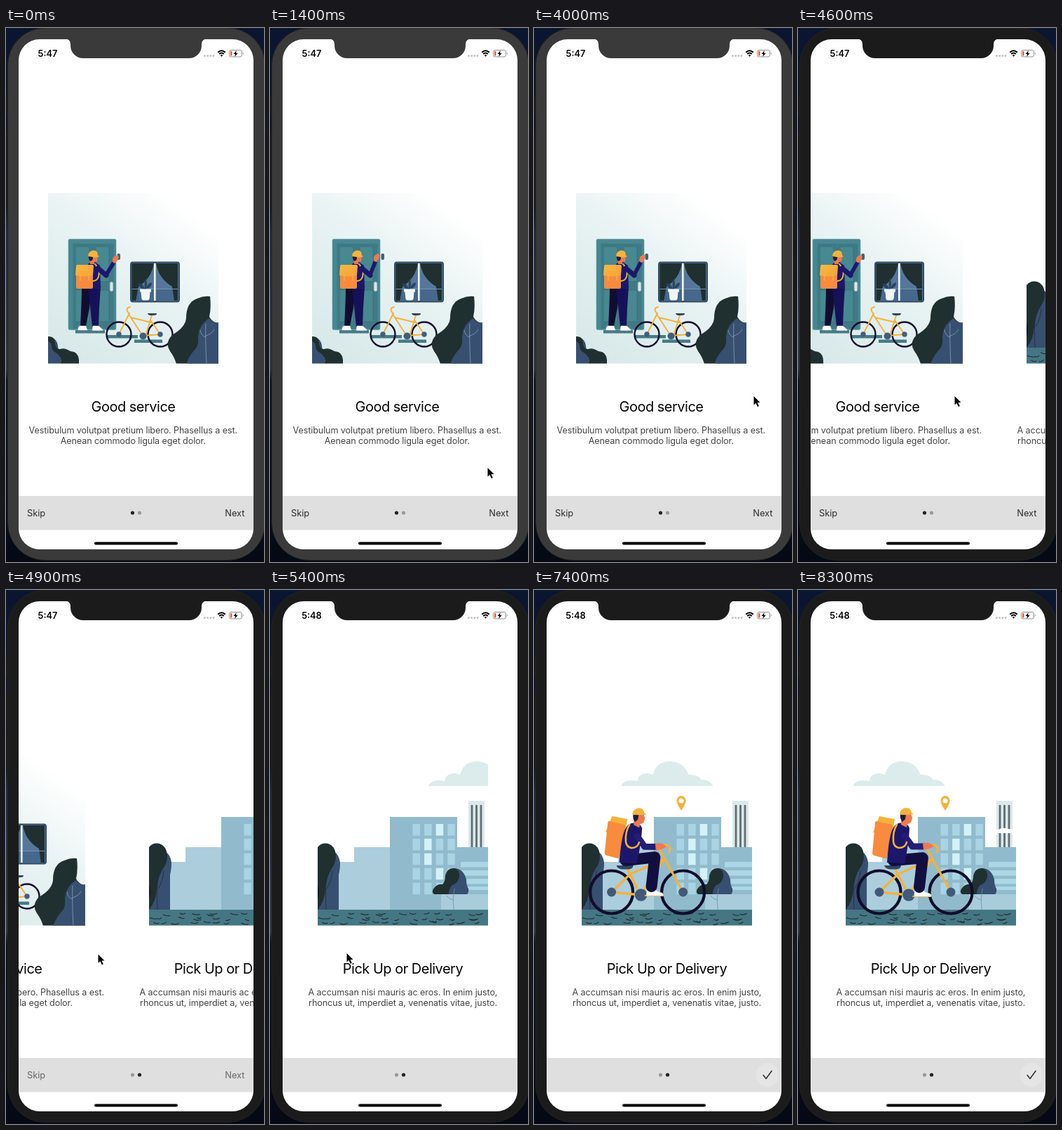
An HTML page that plays this animation: 368x760 px, repeating every 8.4 s.

```html
<!DOCTYPE html>
<html lang="en">
<head>
<meta charset="utf-8">
<title>Onboarding</title>
<style>
html, body { margin: 0; width: 100%; height: 100%; overflow: hidden; background: #0a1429; }
svg { display: block; width: 368px; height: 760px; font-family: Inter, Roboto, sans-serif; }
.mid { text-anchor: middle; }
.title { font-size: 20px; letter-spacing: -.025em; fill: #050505; }
.body { font-size: 12.6px; letter-spacing: -.1px; fill: #444; }
.bar { font-size: 12.8px; fill: #2b2b2b; }
.line { fill: none; stroke-linecap: round; stroke-linejoin: round; }
.yellow { stroke: #f4b13c; }
.ink { fill: #202f30; }
.slate { fill: #374f70; }
</style>
</head>
<body>
<svg viewBox="0 0 368 760">
  <defs>
    <linearGradient id="desk" x2="0" y2="1">
      <stop stop-color="#0a1530"/><stop offset=".33" stop-color="#10172c"/>
      <stop offset=".38" stop-color="#242b48"/><stop offset=".64" stop-color="#333a52"/>
      <stop offset=".66" stop-color="#0b142a"/><stop offset="1" stop-color="#050914"/>
    </linearGradient>
    <linearGradient id="wall" x1=".2" y1="1" x2=".85" y2=".12">
      <stop stop-color="#d8e9e9"/><stop offset=".6" stop-color="#e9f3f3"/><stop offset="1" stop-color="#fff"/>
    </linearGradient>
    <linearGradient id="flap" x2="1" y2="1">
      <stop stop-color="#f9b93f"/><stop offset="1" stop-color="#f6a13a"/>
    </linearGradient>
    <clipPath id="screen"><rect x="18" y="16" width="335" height="726" rx="30"/></clipPath>
    <clipPath id="art1"><rect x="60" y="235" width="243" height="242.500"/></clipPath>
    <clipPath id="art2"><rect x="68" y="235" width="243" height="242.500"/></clipPath>
    <clipPath id="pane"><rect x="179.500" y="335" width="65.500" height="53"/></clipPath>
  </defs>

  <rect width="368" height="760" fill="url(#desk)"/>
  <path d="M0 96h4v28H0zM0 148h4v52H0zM0 203h4v51H0z" fill="#191919"/>
  <rect id="shell" x="2.500" y="0" width="367" height="757.500" rx="53" stroke="#222" stroke-width="1"/>
  <rect x="18" y="16" width="335" height="726" rx="30" fill="#fff"/>

  <g clip-path="url(#screen)">
    <g id="page1">
      <g clip-path="url(#art1)">
        <rect x="60" y="235" width="243" height="243" fill="url(#wall)"/>
        <!-- door and paving -->
        <rect x="89.500" y="301" width="67" height="128" rx="1.500" fill="#478791" stroke="#4d8b95" stroke-width="1.500"/>
        <rect x="95.500" y="307" width="58" height="121" fill="#3f7a85"/>
        <path d="M99 311h20v50H99zM128 311h19v50h-19zM99 373h20v45H99zM128 373h19v45h-19z" fill="#478891" stroke="#39727d"/>
        <rect x="148" y="361" width="5" height="14" rx="2.500" fill="#dbe7e8" stroke="#78949b"/>
        <rect x="158.500" y="321" width="4.500" height="9" rx="2" fill="#3d6278"/>
        <path d="M99 430h42v4.500H99zM143 437h45v4.500h-45zM183 443.500h40v4.500h-40z" fill="#447b85"/>
        <!-- window -->
        <rect x="178" y="333.500" width="69" height="56" rx="3" fill="#56779a" stroke="#304b66" stroke-width="2"/>
        <g clip-path="url(#pane)">
          <path d="M179 372h67v17h-67z" fill="#46688c"/>
          <path d="M179 334h32q-3 22-22 34l-4 21h-6zM246 334h-32q3 22 23 34l3 21h6z" class="ink"/>
          <path d="M179 371.500h67" stroke="#7593ad"/>
          <path d="M212.300 334v55" stroke="#f4f8f8" stroke-width="2.600"/>
        </g>
        <path d="M198 373q-1-10 1-17 4 8 0 17zM197 372q-8-2-8-9 7 1 9 9zM200 371q1-7 8-9 0 8-8 9z" fill="#29435f"/>
        <path d="M191 371.500h16v4h-1.500l-.8 9q-.2 3-3 3h-5.400q-2.800 0-3-3l-.8-9H191z" fill="#eff7f6"/>
        <!-- courier -->
        <path d="M108 368h14l-3 30-5 27h-8q2-40 2-57z" fill="#110d30"/>
        <path d="M117 368h18l-2 30-1 27h-9z" fill="#17115a"/>
        <path d="M105 424h9l2 6h-13q-1-4 2-6zM124 424h8l6 5v1.500h-15z" fill="#fff" stroke="#d5dde1" stroke-width=".5"/>
        <path d="M117 336q4-4 11-2l6 4 1 33h-21z" fill="#1d176b"/>
        <path d="M118 325q1-8 11-4l2 6-1 5-4 1v3h-6z" fill="#ef7a4f"/>
        <path d="M117.500 324h7l-1 6-3 2q-3-3-3-8z" fill="#221a37"/>
        <path d="M117 325q0-8 8-8.500 6 0 6 7l2 2-6 1z" fill="#f5b23b"/>
        <rect x="100" y="338" width="24" height="33" rx="2" fill="#f88b3d"/>
        <path d="M101 337h22q2 0 2 2l-1 13q-12 3-25 0l1-13z" fill="url(#flap)"/>
        <path d="M106 351v8M118 351v8" class="line yellow" stroke-width="1.500"/>
        <path d="M127 336q8 8 5 18-2 6-8 6" class="line yellow" stroke-width="2"/>
        <path d="M131 342L143 352" class="line" stroke="#1d176b" stroke-width="7"/>
        <g id="arm">
          <path d="M143 351L153 335" class="line" stroke="#1d176b" stroke-width="5.500"/>
          <path d="M152 333q-1-6 3-8l4-2 2 3-2 5-4 4z" fill="#ef7a4f"/>
        </g>
        <!-- parked bike -->
        <g class="line" stroke="#110d2d" stroke-width="2.400">
          <circle cx="161" cy="436" r="17.500"/><circle cx="220" cy="436" r="17.500"/>
        </g>
        <path d="M161 436L176 406M178 412L207 419M176 409L195 438M208 409L199 438M207 417L220 436L195 438" class="line yellow" stroke-width="1.900"/>
        <path d="M176 407l-3-4q-2-5 4-6" class="line yellow" stroke-width="2"/>
        <path d="M202 406h13q0 3-4 3h-6q-3-1-3-3z" fill="#2f4663"/>
        <g fill="#425e7b"><circle cx="161" cy="436" r="3.700"/><circle cx="220" cy="436" r="3.700"/><circle cx="195.500" cy="438.500" r="5"/></g>
        <!-- bushes -->
        <path d="M243 478q-3-10-9-18-8-12 3-23 19-11 20-24 0-23 16-28 9-4 18-3 2 16-1 29 4 8 14 10v57z" class="ink"/>
        <path d="M257 478q5-13 13-21 5-5 4-17 1-18 16-27 4 7 13 6v59z" class="slate"/>
        <path d="M285 421q-1 20 1 57M285 440q-7-2-8-10M285 438q8-2 12-9" class="line" stroke="#7f9ab2" stroke-width=".9"/>
        <path d="M60 440q12 0 14 12 0 6 6 26H60z" class="slate"/>
        <path d="M60 439q10-1 10 10 1 8 7 8 6-2 11 1 4 3 9 3 8 3 7 17H79q0-11-8-16-6-3-6-10-1-5-5-6z" class="ink"/>
      </g>
      <text x="181.500" y="546" class="mid title">Good service</text>
      <text x="181.300" y="576.500" class="mid body">Vestibulum volutpat pretium libero. Phasellus a est.</text>
      <text x="181.300" y="592" class="mid body">Aenean commodo ligula eget dolor.</text>
    </g>

    <g id="page2">
      <g clip-path="url(#art2)">
        <path id="cloud" d="M0 279q3-8 15-8 4 0 8 1 2-11 14-11 4 0 8 2 5-19 24-19 20 0 27 19 14-1 18 7 12-1 17 9z" fill="#dcebec"/>
        <path d="M283 300h23v66h-23z" fill="#dbe9ea"/>
        <path d="M288 306v60M294.500 306v60M301 306v60" stroke="#626d71" stroke-width="2.800"/>
        <path id="mist" d="M0 346q2-6 10-5 6-4 14-1h36v6z" fill="#fff"/>
        <path d="M98 387h22v-21h51v89H98z" fill="#accddc"/>
        <path d="M171 323h96v43h44v89H171z" fill="#91bbcc"/>
        <path d="M244 433h67v22h-67z" fill="#a9ccdb"/>
        <path d="M272 387h39v7.500h-39zM272 399h39v7.500h-39zM272 411h39v7.500h-39zM272 422h39v5h-39z" fill="#abd7e6"/>
        <g id="windows"></g>
        <path d="M86 370q12 3 14 18 0 10-2 17v51H68v-50z" class="slate"/>
        <path d="M68 366q6-7 15-5 10 3 11 17 0 10-5 17-8 11-10 30-1 18-11 30z" class="ink"/>
        <path d="M82 395q-4 28-2 60M89 400q-1 14-8 25" class="line" stroke="#202f30" stroke-width=".8"/>
        <path d="M262 396q14 0 18 16 0 8 3 13 1 6-2 8h-30z" class="slate"/>
        <path d="M234 433q-5-4 1-10 5-5 11-4 4-4 4-12 3-12 13-11 8 2 7 12-1 7-6 10-9 3-9 15z" class="ink"/>
        <path d="M262 455q-2-15 1-30M262 441q-7-1-10-6" class="line" stroke="#6d91a7" stroke-width=".8"/>
        <path d="M68 455h243v23H68z" fill="#457683"/>
        <g id="grass" class="line" stroke="#1d2c31" stroke-width="1.100"></g>
        <g id="pin">
          <path d="M0 10.500Q-6.500 1-6.500-4A6.500 6.500 0 0 1 6.500-4Q6.500 1 0 10.500z" fill="#f4b13c"/>
          <circle cy="-3.500" r="3.600" fill="#fff"/>
        </g>
        <g id="ride">
          <g class="line" stroke="#110d2b" stroke-width="4.200">
            <circle cx="116" cy="430" r="30.500"/><circle cx="218" cy="430" r="30.500"/>
          </g>
          <path d="M116 430L158 434L138 396M116 430L143 404L190 384L158 434M187 374L218 430" class="line yellow" stroke-width="3.300"/>
          <path d="M188 377l-3-7M184 366q7-5 13-2 5 4 1 9" class="line yellow" stroke-width="3.300"/>
          <path d="M123 392h24q0 5-7 5.500h-9q-7-1-8-5.500z" fill="#2f4663"/>
          <g fill="#405a77"><circle cx="116" cy="430" r="6.500"/><circle cx="218" cy="430" r="6.500"/><circle cx="158" cy="434" r="8.800"/></g>
          <g id="foot">
            <path d="M-14 5h25" class="line yellow" stroke-width="2"/>
            <path d="M-10-5h9q4 5 11 6 3 2 2 4h-24q-1-5 2-10z" fill="#fff" stroke="#d5dde1" stroke-width=".5"/>
          </g>
          <path id="leg" class="line" stroke="#130e40" stroke-width="16"/>
          <g id="torso">
            <path d="M116 322l22 4-4 25-27-6z" fill="#f5b23b"/>
            <path d="M112 329l22 5q2 1 1 3l-8 43q-1 3-3 2l-15-4q-3-1-3-3l4-43q0-3 2-3z" fill="#f88b3d"/>
            <path d="M127 388q2-32 7-46 4-11 15-11 8 1 10 8-1 23-7 50z" fill="#1d176b"/>
            <path d="M147 320q1-6 13-4l3 8q-1 9-7 9l-1 5-8-4z" fill="#ef7a4f"/>
            <path d="M146 319h8l-1 7-4 4q-4-4-3-11z" fill="#221a37"/>
            <path d="M145 320q0-9 9-10 7 0 8 7l3 2-8 1z" fill="#f5b23b"/>
            <path d="M152 350L163 365L179 365" class="line" stroke="#231d78" stroke-width="9"/>
            <path d="M178 361q8-3 13 1l3 3-6 3-9 2z" fill="#ef7a4f"/>
            <path d="M141 334q-6 9-5 24 1 8 8 9 9 0 11-8" class="line yellow" stroke-width="2.600"/>
          </g>
        </g>
      </g>
      <text x="189.500" y="546" class="mid title">Pick Up or Delivery</text>
      <text x="189.500" y="576.500" class="mid body">A accumsan nisi mauris ac eros. In enim justo,</text>
      <text x="189.500" y="592" class="mid body">rhoncus ut, imperdiet a, venenatis vitae, justo.</text>
    </g>

    <rect x="18" y="666" width="335" height="48.500" fill="#dfdfdf"/>
    <g id="links" class="bar">
      <text x="30" y="694.500">Skip</text>
      <text x="340.500" y="694.500" text-anchor="end">Next</text>
    </g>
    <circle id="dot1" cx="180.500" cy="690" r="2.600"/>
    <circle id="dot2" cx="190.500" cy="690" r="2.600"/>
    <g id="check">
      <circle cx="333" cy="690" r="16.500" fill="#e5e5e5"/>
      <path d="M327 690.500l4 5 8-11" class="line" stroke="#2b2b2b" stroke-width="1.500"/>
    </g>
  </g>

  <path id="notch" d="M84 15q8 1 8 8v2a18 18 0 0 0 18 18h151a18 18 0 0 0 18-18v-2q0-7 8-8z"/>
  <text id="clock" x="59.500" y="41" class="mid" font-size="12.800" font-weight="600"></text>
  <g fill="#c4c4c4"><circle cx="283.500" cy="39.500" r="1.500"/><circle cx="287.700" cy="39.500" r="1.500"/><circle cx="291.900" cy="39.500" r="1.500"/><circle cx="296" cy="39.500" r="1.500"/></g>
  <path d="M302.200 34.700q5.300-5 10.600 0M304.100 37q3.400-3 6.800 0" fill="none" stroke="#000" stroke-width="1.900"/>
  <path d="M305.700 38.800q1.800-1.500 3.600 0l-1.800 2z"/>
  <rect x="318.500" y="31.500" width="18" height="9.500" rx="2.600" fill="#fff" stroke="#8f8f8f"/>
  <path d="M338 34.500q2 1.700 0 3.500z" fill="#999"/>
  <rect x="320" y="33" width="2.400" height="6.500" rx=".8" fill="#d9632f"/>
  <path d="M328.800 32l-4.300 5h2.600l-1 4 4.700-5.200H328z"/>
  <rect x="126" y="731.500" width="119" height="4" rx="2"/>
  <path id="cursor" d="M.5 1v12.500l2.900-2.700 2.400 5.200 2-.9-2.300-5.100h4z" stroke="#fff" stroke-width="2" paint-order="stroke"/>
</svg>
<script>
const LOOP = 8400, STEP = 100;
const $ = id => document.getElementById(id);
const set = (id, attrs) => { for (const k in attrs) $(id).setAttribute(k, attrs[k]); };
const move = (id, x, y = 0, more = '') => set(id, { transform: `translate(${x} ${y})${more}` });
const clamp = v => Math.max(0, Math.min(1, v));
const ramp = (t, from, to) => clamp((t - from) / (to - from));

// Linear interpolation over rows of [time, ...values].
function track(rows, t) {
  if (t <= rows[0][0]) return rows[0].slice(1);
  const i = rows.findIndex(r => r[0] > t);
  if (i < 0) return rows[rows.length - 1].slice(1);
  const a = rows[i - 1], b = rows[i], p = ramp(t, a[0], b[0]);
  return a.slice(1).map((v, k) => v + (b[k + 1] - v) * p);
}

const POINTER = [
  [800, 316, 711], [1100, 311, 640], [1400, 310, 625], [1900, 311, 622], [2700, 313, 528],
  [3600, 313, 523], [4300, 313, 523], [4500, 268, 523], [4600, 223, 523], [4800, 150, 519],
  [5000, 112, 516], [5400, 109, 516], [6500, 205, 640], [6800, 209, 643], [7200, 208, 522]
];
const SCROLL = [
  [4300, 0], [4400, 2], [4500, 27], [4600, 68], [4800, 148], [4900, 190],
  [5000, 255], [5100, 295], [5200, 314], [5300, 322], [5400, 326]
];

function buildWindows() {
  const lit = ['0,2', '1,1', '2,1', '3,2'];
  let out = '';
  for (let r = 0; r < 5; r++) for (let c = 0; c < 4; c++) {
    const fill = lit.includes(`${r},${c}`) ? '#d3f1f8' : '#a9d4e4';
    out += `<rect x="${203.5 + c * 16.6}" y="${333 + r * 20.9}" width="10.500" height="16.500" fill="${fill}"/>`;
  }
  $('windows').innerHTML = out;
}

function buildGrass() {
  let seed = 7, d = '';
  const rnd = () => (seed = seed * 16807 % 2147483647) / 2147483647;
  for (let i = 0; i < 39; i++) {
    const x = 66 + i % 13 * 19 + rnd() * 10, y = 459 + Math.floor(i / 13) * 6 + rnd() * 4;
    const w = (5 + rnd() * 6) * (rnd() < .5 ? -1 : 1);
    d += `M${x} ${y}q${w / 2} ${2 + rnd()} ${w} ${rnd() * 2}`;
  }
  $('grass').innerHTML = `<path d="${d}"/>`;
}

function drawRider(t) {
  const left = (1 - ramp(t, 5400, 8300)) ** 3, dx = -181 * left;
  move('ride', dx);
  set('torso', { transform: `rotate(${3.5 * Math.min(1, left * 7)} 137 385)` });

  const a = dx / 32 * .3, hx = 136, hy = 385, bone = 42;
  const fx = 158 + 20 * Math.cos(a), fy = 431 + 20 * Math.sin(a);
  move('foot', fx, fy);
  const ax = fx - 5, ay = fy - 8, vx = ax - hx, vy = ay - hy, len = Math.hypot(vx, vy);
  const h = Math.sqrt(bone * bone - len * len / 4) / len;
  const kx = (hx + ax) / 2 + vy * h, ky = (hy + ay) / 2 - vx * h;
  set('leg', { d: `M${hx} ${hy}L${kx} ${ky}L${ax} ${ay}` });
}

function draw(t) {
  const [scroll] = track(SCROLL, t), second = t >= 4900;
  const body = t < 4300 ? '#3a3a3a' : '#1b1b1b';
  set('shell', { fill: body });
  set('notch', { fill: body });
  $('clock').textContent = t < 5000 ? '5:47' : '5:48';

  move('page1', -scroll);
  move('page2', 326 - scroll);
  set('dot1', { fill: second ? '#999' : '#222' });
  set('dot2', { fill: second ? '#222' : '#999' });
  set('links', { opacity: 1 - ramp(t, 4800, 5100) });
  set('check', { opacity: ramp(t, 5500, 7100) });

  const knock = (1 - Math.cos(t / 950 * 2 * Math.PI)) / 2;
  set('arm', { transform: `rotate(${-10 * knock} 143 352)` });

  const drift = .0508 * (8300 - t);
  move('cloud', 78.7 + drift);
  move('mist', 276 + drift);
  const pop = ramp(t, 6500, 7100);
  move('pin', 210, 303.5, ` scale(${Math.sin(pop * Math.PI / 2) ** .7})`);
  drawRider(t);

  const [x, y] = track(POINTER, t);
  move('cursor', x, y);
  set('cursor', { visibility: t >= 800 && t < 7300 ? 'visible' : 'hidden' });
}

buildWindows();
buildGrass();
const start = performance.now();
function tick() {
  const t = (performance.now() - start) % LOOP;
  draw(Math.floor(t / STEP) * STEP);
  requestAnimationFrame(tick);
}
tick();
</script>
</body>
</html>
```
